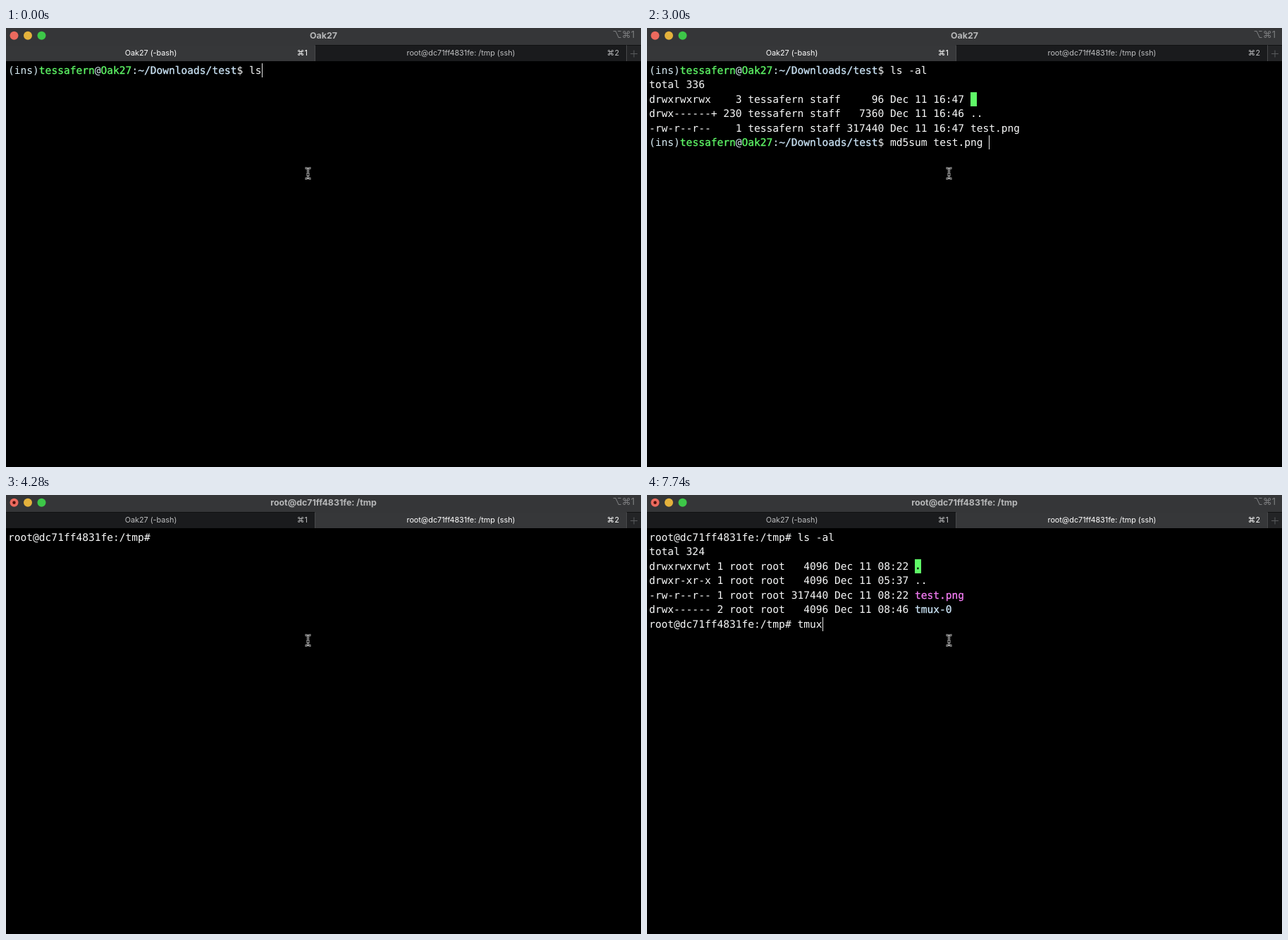
An HTML page for the animation above (8000 ms loop, 901 by 622 pixels).

```html
<!DOCTYPE html>
<html lang="en">
<head>
<meta charset="utf-8">
<title>Terminal</title>
<style>
html, body { margin: 0; width: 100%; height: 100%; overflow: hidden; background: #000; }
#stage { position: relative; width: 901px; height: 622px; overflow: hidden; background: #000; }
#stage div, svg { position: absolute; }
.bar { left: 0; top: 0; width: 901px; height: 47px; background: #353638; }
.bar div { font: 10.8px/22px Inter, "DejaVu Sans", sans-serif; white-space: pre; text-align: center; }
.bar #title { left: 0; top: 0; width: 901px; color: #b6b7b8; font-size: 12.4px; line-height: 21px; font-weight: 700; }
.bar #shortcut { right: 9px; top: -2px; color: #7c7d7f; font-size: 13px; }
.bar .tab { top: 25px; height: 22px; background: #1a1b1d; color: #bebfc0; box-shadow: 0 -1px #101112; }
.bar .tab.on { background: #363739; color: #fff; box-shadow: none; }
.bar .tab.add { background: #232426; }
.tab div { right: 10px; top: 0; }
.pane { left: 0; top: 50px; }
.text, .text span { font: 14.57px/20.43px "DejaVu Sans Mono", "Liberation Mono", monospace; }
.text { left: 3px; top: 1px; color: #f8f9f9; white-space: pre; text-rendering: geometricPrecision; }
.text span { -webkit-text-stroke: .3px; }
.text .p { color: #d8ecf4; -webkit-text-stroke: 0; }
.text .g { color: #5ff967; }
.text .b { color: #cbe4f6; }
.text .m { color: #f57df5; }
.text .block { display: inline-block; height: 20.43px; margin: -1px 0 1px; vertical-align: top; background: #5ff967; color: #000; }
.text .dim { color: #5ff967; }
.caret { width: 1px; height: 20px; background: #e8e8e8; }
</style>
</head>
<body>
<div id="stage">
  <div class="pane" id="local"><div class="text"></div><div class="caret"></div></div>
  <div class="pane" id="remote"><div class="text"></div><div class="caret"></div></div>
  <div class="bar">
    <div id="title"></div>
    <div id="shortcut">⌥⌘1</div>
    <div class="tab" style="left:0;width:438px;text-indent:-27px">Oak27 (-bash)<div style="text-indent:0">⌘1</div></div>
    <div class="tab" style="left:439px;width:441px;text-indent:-28px">root@dc71ff4831fe: /tmp (ssh)<div style="text-indent:0">⌘2</div></div>
    <div class="tab add" style="left:881px;width:20px"></div>
  </div>
  <svg width="901" height="622" fill="none">
    <circle cx="11.5" cy="10.7" r="6" fill="#ec6a5e"/>
    <circle cx="31" cy="10.7" r="6" fill="#e4b23c"/>
    <circle cx="50.5" cy="10.7" r="6" fill="#3dc748"/>
    <circle id="dirty" cx="11.5" cy="10.7" r="2.2" fill="#4c0e09"/>
    <path d="M438.5 25v22M880.5 25v22" stroke="#48494b"/>
    <path d="M886 36.5h10M891 31.5v10" stroke="#595a5c"/>
    <path id="beam" d="M424.5 198.5q3.5 0 4 2q.5-2 4-2M428.5 200.5v11M424.5 213.5q3.5 0 4-2q.5 2 4 2M426.5 207.5h4" stroke="#eee" stroke-width="2.6"/>
    <use href="#beam" style="filter:brightness(0)" visibility="hidden"/>
    <path d="M424.5 198.5q3.5 0 4 2q.5-2 4-2M428.5 200.5v11M424.5 213.5q3.5 0 4-2q.5 2 4 2M426.5 207.5h4" stroke="#000"/>
  </svg>
</div>
<script>
const LOOP = 8000, CHAR = 8.772, ROW = 20.43;
const $ = id => document.getElementById(id);
const paint = (cls, text) => `<span class="${cls}">${text}</span>`;

const user = "tessafern", host = "Oak27";
const localPrompt = paint("p", "(ins)") + paint("g", user) + paint("p", "@") + paint("g", host) +
  paint("p", ":") + paint("b", "~/Downloads/test") + "$ ";
const remotePrompt = "root@dc71ff4831fe:/tmp# ";
const LOCAL_COL = 39, REMOTE_COL = 24;

const localList = [
  "total 336",
  `drwxrwxrwx    3 ${user} staff     96 Dec 11 16:47 ` + paint("block dim", "."),
  `drwx------+ 230 ${user} staff   7360 Dec 11 16:46 ..`,
  `-rw-r--r--    1 ${user} staff 317440 Dec 11 16:47 test.png`
];
const remoteList = [
  "total 324",
  "drwxrwxrwt 1 root root   4096 Dec 11 08:22 " + paint("block", "."),
  "drwxr-xr-x 1 root root   4096 Dec 11 05:37 ..",
  "-rw-r--r-- 1 root root 317440 Dec 11 08:22 " + paint("m", "test.png"),
  "drwx------ 2 root root   4096 Dec 11 08:46 " + paint("b", "tmux-0")
];

// Part of a command typed by time t, one key per entry in times.
const typed = (t, command, times) => command.slice(0, times.filter(k => k <= t).length);

function localScreen(t) {
  const list = typed(t, "ls -al", [0, 0, 90, 195, 300, 450]);
  const lines = [localPrompt + list];
  if (t < 840) return { lines, row: 0, col: LOCAL_COL + list.length };
  const sum = t < 3000
    ? typed(t, "md5sum te", [1340, 1490, 1700, 2000, 2120, 2360, 2470, 2650, 2850])
    : "md5sum test.png ";
  lines.push(...localList, localPrompt + sum);
  if (t < 3390) return { lines, row: 5, col: LOCAL_COL + sum.length };
  if (t < 3450) return { lines, row: 6, col: 0 };
  lines.push("7c04b95ea38f62d01121e81d4e239d6a  test.png", localPrompt);
  return { lines, row: 7, col: LOCAL_COL };
}

function remoteScreen(t) {
  const list = typed(t, "ls -al", [5320, 5380, 5640, 5820, 5920, 6020]);
  const lines = [remotePrompt + list];
  const caret = t >= 4610 && t < 5080 || t >= 5320;
  if (t < 6380) return { lines, row: 0, col: REMOTE_COL + list.length, caret };
  const tmux = typed(t, "tmux", [6850, 7450, 7620, 7740]);
  lines.push(...remoteList, remotePrompt + tmux);
  return { lines, row: 6, col: REMOTE_COL + tmux.length, caret };
}

function show(pane, { lines, row, col, caret = true }, x) {
  const [text, bar] = pane.children;
  const html = lines.join("\n");
  if (pane.shown !== html) text.innerHTML = pane.shown = html;
  bar.style.left = Math.floor(3.5 + col * CHAR) + "px";
  bar.style.top = Math.round(row * ROW) + "px";
  bar.style.visibility = caret ? "visible" : "hidden";
  pane.style.left = x + "px";
  pane.style.display = Math.abs(x) < 901 ? "block" : "none";
}

const tabs = document.querySelectorAll(".tab");
function render(t) {
  const slide = t < 4100 ? 0 : t < 4190 ? 144 : t < 4280 ? 600 : 904;
  const onRemote = t >= 4280;
  show($("local"), localScreen(t), -slide);
  show($("remote"), remoteScreen(t), 904 - slide);
  tabs[0].classList.toggle("on", !onRemote);
  tabs[1].classList.toggle("on", onRemote);
  $("title").textContent = onRemote ? "root@dc71ff4831fe: /tmp" : host;
  $("dirty").style.display = onRemote ? "" : "none";
}

const start = performance.now();
function tick() {
  render((performance.now() - start) % LOOP);
  requestAnimationFrame(tick);
}
tick();
</script>
</body>
</html>
```
